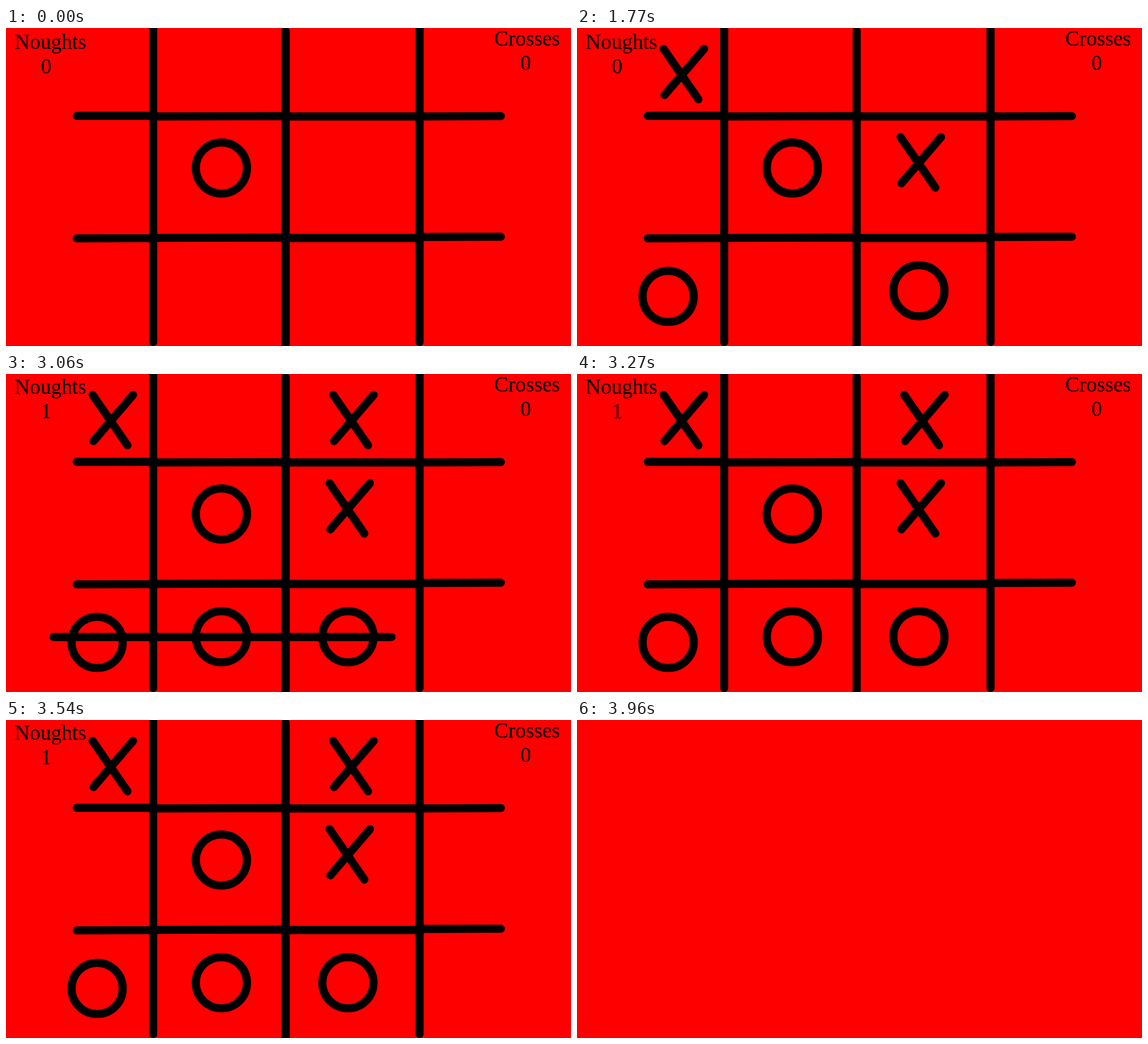
Write an HTML page that moves like this. It is 998 by 561 pixels and loops after 9.03 s.

```html
<!DOCTYPE html>
<html lang="en">
<head>
<meta charset="utf-8">
<title>Noughts and Crosses</title>
<style>
  html, body { margin: 0; width: 100%; height: 100%; overflow: hidden; background: #f00; }
  svg { display: block; }
  path, circle { fill: none; stroke: #000; stroke-width: 14.3; stroke-linecap: round; }
  text { font: 37.3px "Liberation Serif", "Times New Roman", serif; text-anchor: middle; }
</style>
</head>
<body>
<svg width="998" height="561" viewBox="0 0 998 561">
  <defs>
    <circle id="nought" r="45.2"/>
    <path id="cross" d="M-32.5-44.5 29 44.5M39-44.5-31 37"/>
  </defs>
  <g id="game">
    <path d="M260-10V554M494 5V580M730.5-10V554"/>
    <path d="M125 155H260M260 156 494 155.3M494 156H731L874 155.4"/>
    <path d="M125 371.2 260 370.6M260 370.4 494 369.6M494 370.5H731M731 368.6 874 368.2"/>
    <g id="marks"></g>
    <g id="score">
      <text x="78.5" y="37">Noughts</text>
      <text id="points" x="71" y="80">0</text>
    </g>
    <text x="920.5" y="31">Crosses</text>
    <text x="918" y="73.7">0</text>
    <path id="strike" d="M84 464H681"/>
  </g>
</svg>
<script>
const $ = id => document.getElementById(id);
const LOOP = 9030, STEP = 30, WIN = 2880, CLEAR = 3960;

// Moves in order of play: start time, mark, centre
const moves = [
  [0, 'nought', 380.5, 247],
  [420, 'cross', 604, 237],
  [870, 'nought', 604, 463.5],
  [1320, 'cross', 185.5, 81.3],
  [1770, 'nought', 161, 473.5],
  [2220, 'cross', 610.5, 81.3],
  [2670, 'nought', 380.5, 463.5]
].map(([start, mark, x, y]) => {
  const node = document.createElementNS('http://www.w3.org/2000/svg', 'use');
  node.setAttribute('href', '#' + mark);
  node.setAttribute('x', x);
  node.setAttribute('y', y);
  $('marks').append(node);
  return { start, node };
});

const show = (node, on) => node.setAttribute('visibility', on ? 'inherit' : 'hidden');

// The winning line flickers, holding one extra step every 14
function struck(t) {
  const k = Math.floor((t - WIN) / STEP);
  return k >= 0 && k < 34 && (k - Math.floor(k / 14)) % 2 === 0;
}

function draw(t) {
  const won = t >= WIN;
  show($('game'), t < CLEAR);
  moves.forEach(m => show(m.node, t >= m.start));
  show($('strike'), struck(t));
  $('points').textContent = won ? 1 : 0;
  $('score').setAttribute('transform', `translate(0 ${won ? -1.8 : 0})`);
}

const begin = performance.now();
function tick() {
  draw((performance.now() - begin) % LOOP);
  requestAnimationFrame(tick);
}
tick();
</script>
</body>
</html>
```
